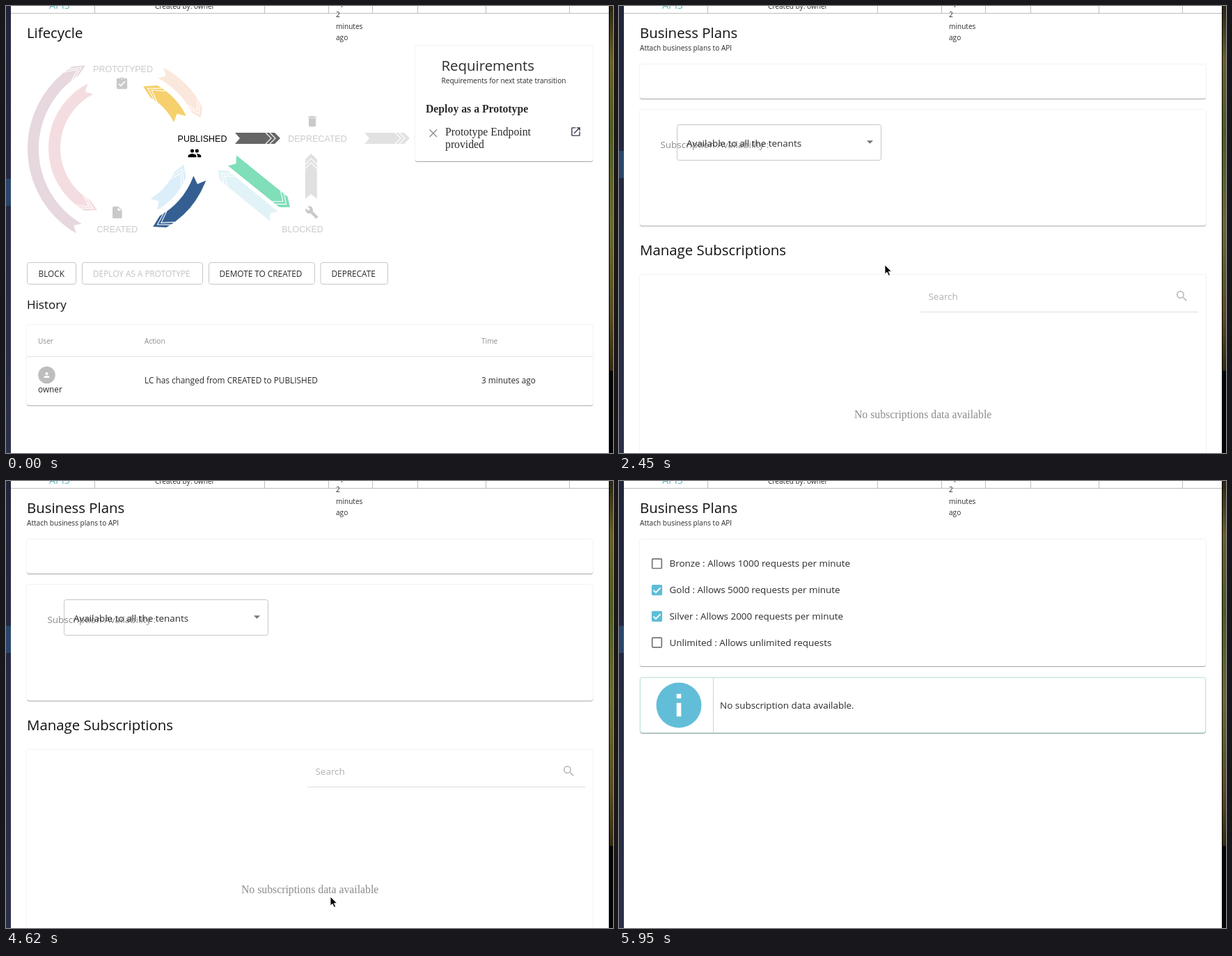
Write an HTML page that moves like this. It is 872 px wide and 642 px high and loops after 6.02 s.

```html
<!DOCTYPE html>
<html lang="en">
<head>
<meta charset="utf-8">
<title>API lifecycle and business plans</title>
<style>
  html, body { margin: 0; width: 100%; height: 100%; overflow: hidden; background: #fff; }
  svg { display: block; width: 872px; height: 642px; }
  text { font: 11.8px "Open Sans", sans-serif; fill: #2b2b2b; white-space: pre; }
  .title { font-size: 20.4px; fill: #111; }
  .sub { font-size: 17px; fill: #111; }
  .small { font-size: 10.1px; }
  .body { font-size: 13.45px; }
  .serif { font: 15.75px "Liberation Serif", serif; }
  .state { font: 12.5px "Liberation Sans", sans-serif; text-anchor: middle; fill: #cbcbcb; }
  .muted { fill: #8c8c8c; }
  .pale { fill: #b0b0b0; }
  .off { fill: #c2c2c2; }
  .card { fill: #fff; filter: drop-shadow(0 1px .6px rgba(0,0,0,.3)) drop-shadow(0 0 1px rgba(0,0,0,.13)); }
  .outline { fill: none; stroke: #c6c6c6; }
  .icons { fill: #c9c9c9; }
  .box { fill: none; stroke: #757575; stroke-width: 1.7; }
  .tick rect { fill: #5fbdd7; }
  .tick path { fill: none; stroke: #fff; stroke-width: 1.8; }

  .step { animation: 6020ms step-end infinite; }
  #menu { animation-name: menu; }
  #lifecycle { animation-name: leave; }
  #plans { animation-name: enter; }
  #loading { animation-name: unload; }
  #loaded { animation-name: load; }
  #lower { animation-name: lower; }
  #notice { animation-name: notice; }
  #cursor { animation: cursor 6020ms linear infinite; }

  @keyframes menu { 0% { transform: none } 19.76%, 100% { transform: translateY(-40px) } }
  @keyframes leave { 0% { opacity: 1 } 19.76%, 100% { opacity: 0 } }
  @keyframes enter { 0% { opacity: 0 } 19.76%, 100% { opacity: 1 } }
  @keyframes unload { 0% { opacity: 1 } 88.36%, 100% { opacity: 0 } }
  @keyframes load { 0% { opacity: 0 } 88.36%, 100% { opacity: 1 } }
  @keyframes lower {
    0% { transform: none; opacity: 1 }
    88.36% { transform: translateY(133px); opacity: 1 }
    90.69%, 100% { transform: translateY(133px); opacity: 0 }
  }
  @keyframes notice { 0% { opacity: 0 } 90.69%, 100% { opacity: 1 } }
  @keyframes cursor {
    0%, 32% { transform: translate(-15px, 215px) }
    36% { transform: translate(255px, 370px) }
    38.4% { transform: translate(370px, 392px) }
    40.7%, 42.4% { transform: translate(382px, 372px) }
    46.5% { transform: translate(270px, 495px) }
    50% { transform: translate(80px, 400px) }
    52.33%, 65% { transform: translate(-15px, 245px) }
    69.8% { transform: translate(250px, 520px) }
    74.42% { transform: translate(453px, 606px) }
    76.74% { transform: translate(466px, 597px) }
    82.56%, 87.21% { transform: translate(483px, 592px) }
    89.53%, 93.1% { transform: translate(496px, 587px) }
    97.5%, 100% { transform: translate(560px, 660px) }
  }
</style>
</head>
<body>
<svg viewBox="0 0 872 642">
  <defs>
    <linearGradient id="photo" x2="0" y2="1">
      <stop offset="0" stop-color="#2b2412"/>
      <stop offset=".15" stop-color="#6a6027"/>
      <stop offset=".35" stop-color="#4f5a20"/>
      <stop offset=".6" stop-color="#6b6a2c"/>
      <stop offset=".85" stop-color="#594a1e"/>
      <stop offset="1" stop-color="#33280f"/>
    </linearGradient>
    <linearGradient id="side" x2="0" y2="1">
      <stop offset="0" stop-color="#20253b"/>
      <stop offset="1" stop-color="#2b3049"/>
    </linearGradient>
  </defs>

  <rect width="872" height="642" fill="#fff"/>
  <rect width="7" height="642" fill="url(#side)"/>
  <rect id="menu" class="step" y="248" width="7" height="39" fill="#2a466c"/>
  <rect x="866" width="6" height="642" fill="#050505"/>
  <rect x="867" width="5" height="524" fill="url(#photo)"/>

  <path d="M7 10.5H866M127.5 0V10M371.5 0V10M463.5 0V10M526.5 0V10M591.5 0V10M689.5 0V10M809.5 0V10" stroke="#bdbdbd"/>
  <text x="62" y="4" style="font-size:14.3px;fill:#62b5bd">APIS</text>
  <g class="small">
    <text class="small" x="214" y="4">Created by: owner</text>
    <text class="small" x="474" y="-1">Up</text>
    <text class="small" x="474" y="16">2</text>
    <text class="small" x="474" y="32.5">minutes</text>
    <text class="small" x="474" y="49">ago</text>
  </g>

  <g id="lifecycle" class="step">
    <text class="title" x="30" y="46">Lifecycle</text>
    <g id="arrows"></g>

    <text class="state" x="168" y="95">PROTOTYPED</text>
    <text class="state" x="282" y="194.5" style="fill:#000">PUBLISHED</text>
    <text class="state" x="447.5" y="194.5">DEPRECATED</text>
    <text class="state" x="160" y="325">CREATED</text>
    <text class="state" x="426" y="325">BLOCKED</text>
    <g class="icons">
      <path transform="translate(156.3 101.3) scale(.85)" d="M19 3h-4.18C14.4 1.84 13.3 1 12 1s-2.4.84-2.82 2H5a2 2 0 0 0-2 2v14a2 2 0 0 0 2 2h14a2 2 0 0 0 2-2V5a2 2 0 0 0-2-2zm-7 0a1 1 0 0 1 0 2 1 1 0 0 1 0-2zm-2 14l-4-4 1.4-1.4 2.6 2.6 6.6-6.6L18 9z"/>
      <path transform="translate(429.8 155.4) scale(.85)" d="M6 19a2 2 0 0 0 2 2h8a2 2 0 0 0 2-2V7H6zM19 4h-3.5l-1-1h-5l-1 1H5v2h14z"/>
      <path transform="translate(149.6 286.4) scale(.85)" d="M6 2a2 2 0 0 0-2 2v16a2 2 0 0 0 2 2h12a2 2 0 0 0 2-2V8l-6-6zm7 7V3.5L18.5 9z"/>
      <path transform="translate(429.5 286.7) scale(.82)" d="M22.7 19l-9.1-9.1c.9-2.3.4-5-1.5-6.9-2-2-5-2.4-7.4-1.3L9 6 6 9 1.6 4.7C.4 7.1.9 10.1 2.9 12.1c1.9 1.9 4.6 2.4 6.9 1.5l9.1 9.1c.4.4 1 .4 1.4 0l2.3-2.3c.5-.4.5-1.1.1-1.4z"/>
      <path transform="translate(260.7 201.2) scale(.85)" fill="#000" d="M16 11a3 3 0 1 0 0-6 3 3 0 0 0 0 6zm-8 0a3 3 0 1 0 0-6 3 3 0 0 0 0 6zm0 2c-2.3 0-7 1.2-7 3.5V19h14v-2.5C15 14.200 10.300 13 8 13zm8 0l-1 .05c1.200.85 2 2 2 3.450V19h6v-2.500c0-2.300-4.700-3.500-7-3.500z"/>
    </g>

    <rect class="card" x="588" y="57" width="255" height="166" rx="3"/>
    <text class="title" x="625.5" y="93" style="font-weight:500;fill:#2b2b2b">Requirements</text>
    <text class="small" x="625.5" y="110.500">Requirements for next state transition</text>
    <text class="serif" x="603" y="153" style="font-weight:bold">Deploy as a Prototype</text>
    <text class="serif" x="631" y="186">Prototype Endpoint</text>
    <text class="serif" x="631" y="203.5">provided</text>
    <path d="M608.5 177.500l10.500 10.500m0-10.500l-10.500 10.500" stroke="#8a8a8a" stroke-width="1.3"/>
    <path transform="translate(810.1 172.100) scale(.7)" fill="#39344f" d="M19 19H5V5h7V3H5a2 2 0 0 0-2 2v14a2 2 0 0 0 2 2h14a2 2 0 0 0 2-2v-7h-2zM14 3v2h3.600l-9.800 9.800 1.400 1.400L19 6.400V10h2V3z"/>

    <g class="outline">
      <rect x="30.5" y="368.500" width="70" height="31" rx="3"/>
      <rect x="109.5" y="368.500" width="173" height="31" rx="3"/>
      <rect x="291.500" y="368.500" width="152" height="31" rx="3"/>
      <rect x="452" y="368.500" width="96.500" height="31" rx="3"/>
    </g>
    <text x="46.500" y="388.500">BLOCK</text>
    <text class="off" x="125" y="388.500">DEPLOY AS A PROTOTYPE</text>
    <text x="306.500" y="388.500">DEMOTE TO CREATED</text>
    <text x="467.500" y="388.500">DEPRECATE</text>

    <text class="sub" x="30" y="435">History</text>
    <rect class="card" x="30" y="458" width="813" height="115.500" rx="3"/>
    <path d="M30 503.500H843" stroke="#e2e2e2"/>
    <text class="small muted" x="46" y="484.500">User</text>
    <text class="small muted" x="199" y="484.500">Action</text>
    <text class="small muted" x="683" y="484.500">Time</text>
    <circle cx="58.500" cy="530" r="12.300" fill="#bdbdbd"/>
    <path transform="translate(52.500 524) scale(.5)" fill="#fff" d="M12 12a4 4 0 1 0 0-8 4 4 0 0 0 0 8zm0 2c-2.700 0-8 1.300-8 4v2h16v-2c0-2.700-5.300-4-8-4z"/>
    <text x="46" y="555">owner</text>
    <text x="199" y="542">LC has changed from CREATED to PUBLISHED</text>
    <text x="683" y="542">3 minutes ago</text>
  </g>

  <g id="plans" class="step">
    <text class="title" x="30" y="46">Business Plans</text>
    <text class="small" x="30" y="63.500">Attach business plans to API</text>
    <rect id="loading" class="card step" x="30" y="84" width="813" height="49" rx="3"/>

    <g id="loaded" class="step">
      <rect class="card" x="30" y="84" width="813" height="182" rx="3"/>
      <rect class="box" x="47.700" y="111.900" width="13.600" height="13.600" rx="1"/>
      <g class="tick">
        <rect x="46.900" y="149" width="15.200" height="15.200" rx="1.700"/>
        <path d="M49.500 156.800l3.400 3.400 6.700-6.900"/>
        <rect x="46.900" y="186.800" width="15.200" height="15.200" rx="1.700"/>
        <path d="M49.500 194.600l3.400 3.400 6.700-6.900"/>
      </g>
      <rect class="box" x="47.700" y="225.200" width="13.600" height="13.600" rx="1"/>
      <text class="body" x="72.500" y="123">Bronze : Allows 1000 requests per minute</text>
      <text class="body" x="72.500" y="161">Gold : Allows 5000 requests per minute</text>
      <text class="body" x="72.500" y="198.700">Silver : Allows 2000 requests per minute</text>
      <text class="body" x="72.500" y="236.500">Unlimited : Allows unlimited requests</text>
    </g>

    <g id="lower" class="step">
      <rect class="card" x="30" y="149" width="813" height="166.500" rx="3"/>
      <text class="body muted" x="59.500" y="203.500">Subscription Availability :</text>
      <rect class="outline" x="83.500" y="170.500" width="293" height="51" rx="3"/>
      <text class="body" x="97" y="201.500">Available to all the tenants</text>
      <path d="M356 193.300h9l-4.500 4.500z" fill="#757575"/>
      <text class="title" x="30" y="358">Manage Subscriptions</text>
      <rect class="card" x="30" y="386" width="813" height="300" rx="3"/>
      <text class="body pale" x="444.500" y="421.500">Search</text>
      <path transform="translate(798.400 406.600) scale(.85)" fill="#bdbdbd" d="M15.500 14h-.800l-.300-.300A6.500 6.500 0 1 0 13.700 14.400l.300.300v.800l5 5 1.500-1.500zm-6 0a4.500 4.500 0 1 1 0-9 4.500 4.500 0 0 1 0 9z"/>
      <path d="M433 439.500H832" stroke="#dedede"/>
      <text class="serif muted" x="338" y="592">No subscriptions data available</text>
    </g>

    <g id="notice" class="step">
      <rect class="card" x="30.500" y="282.500" width="812" height="79" rx="3" stroke="#bfe3e0"/>
      <path d="M135.500 283V361" stroke="#cbd6d8"/>
      <circle cx="86" cy="322" r="32.500" fill="#62bed8"/>
      <path d="M82.700 305.700h6.600v6.500h-6.600zM82.700 318.700h6.600v19.600h-6.600z" fill="#fff"/>
      <text class="body" x="145" y="327">No subscription data available.</text>
    </g>
  </g>

  <path id="cursor" d="M0 0V13L3 10.200 5.300 15.300 7.500 14.300 5.200 9.400H9.300Z" fill="#000" stroke="#fff" stroke-width=".8"/>
</svg>
<script>
  const arrows = document.getElementById('arrows');
  const join = points => points.map(p => p.map(v => v.toFixed(1)).join(' ')).join('L');

  function draw(outline, chevron, color) {
    arrows.innerHTML += `<path d="${outline}" fill="${color}"/>` +
      [7, 13].map(back => `<path d="M${join(chevron(back))}" fill="none" stroke="#fff" stroke-width="1.1"/>`).join('');
  }

  // Arrow along a circle; angles in degrees, w is half the band's width.
  function arcArrow(cx, cy, r, w, from, to, head, color) {
    const dir = Math.sign(to - from);
    const at = (radius, deg, ahead = 0) => {
      const a = deg * Math.PI / 180 + dir * ahead / r;
      return [cx + radius * Math.cos(a), cy + radius * Math.sin(a)];
    };
    const arc = (radius, sweep, end) => `A${radius} ${radius} 0 0 ${sweep} ${join([end])}`;
    const sweep = dir > 0 ? 1 : 0;
    const chevron = back => [at(r + w, to, -back), at(r, to, head - back), at(r - w, to, -back)];
    draw(`M${join([at(r + w, from)])}${arc(r + w, sweep, at(r + w, to))}` +
      `L${join([at(r, to, head), at(r - w, to)])}${arc(r - w, 1 - sweep, at(r - w, from))}` +
      `L${join([at(r, from, 9)])}Z`, chevron, color);
  }

  function lineArrow(x0, y0, x1, y1, w, head, color) {
    const length = Math.hypot(x1 - x0, y1 - y0);
    const ux = (x1 - x0) / length, uy = (y1 - y0) / length;
    const at = (along, side) => [x0 + ux * along - uy * side, y0 + uy * along + ux * side];
    const neck = length - head;
    const chevron = back => [at(neck - back, w), at(length - back, 0), at(neck - back, -w)];
    draw(`M${join([at(0, w), ...chevron(0), at(0, -w), at(7, 0)])}Z`, chevron, color);
  }

  arcArrow(171.8, 205, 132.8, 8, 120.3, 237, 17, '#e6d8de');
  arcArrow(165, 204, 95.5, 8.5, 243, 120, 15.5, '#f4dde0');
  arcArrow(165, 205, 95, 10, -26.5, -60, 17, '#f6d06d');
  arcArrow(165, 205, 123, 8.5, -62.4, -27, 13, '#fbe8dc');
  arcArrow(165, 205, 93, 9.5, 59.5, 24, 16, '#dbeef9');
  arcArrow(165, 205, 121, 9.5, 20.5, 60, 16, '#355f92');
  lineArrow(325, 222, 408, 289, 9.5, 12, '#80deb8');
  lineArrow(385, 302, 304, 236, 9, 12, '#e2f3f7');
  lineArrow(329, 190, 394, 190, 8, 8, '#666');
  lineArrow(515, 190, 580, 190, 8, 8, '#e2e2e2');
  lineArrow(438.3, 277, 438.3, 212, 8.5, 8.5, '#e0e0e0');
</script>
</body>
</html>
```
